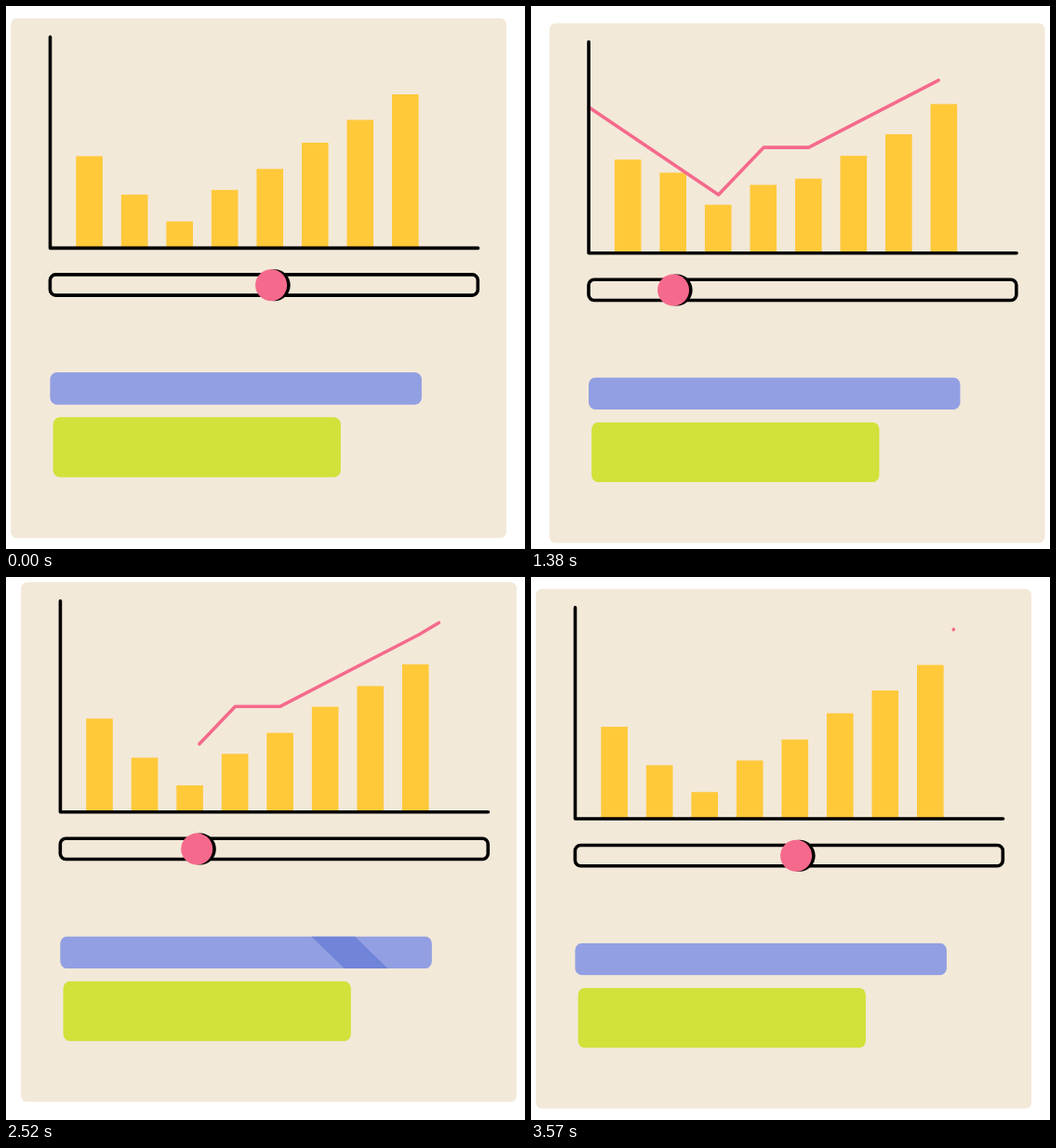
Recreate the animation shown at these times as an HTML page. Size 558 by 584 pixels, loop 3.6 s.

```html
<!DOCTYPE html>
<html lang="en">
<head>
<meta charset="utf-8">
<title>Chart panel</title>
<style>
  html, body { margin: 0; width: 100%; height: 100%; overflow: hidden; background: #fff; }
  svg { display: block; width: 558px; height: 584px; }
</style>
</head>
<body>
<svg viewBox="0 0 558 584" xmlns="http://www.w3.org/2000/svg">
  <defs>
    <clipPath id="blueClip"><rect x="47.4" y="394.1" width="399.5" height="34.6" rx="7.5"/></clipPath>
    <clipPath id="greenClip"><rect x="50.6" y="442.3" width="309.3" height="64.5" rx="7.5"/></clipPath>
  </defs>
  <g id="panel">
    <rect x="5.2" y="13.2" width="532.8" height="559" rx="6.5" fill="#f3e9d9"/>
    <g id="bars" fill="#ffc93a"></g>
    <path id="trend" fill="none" stroke="#f56a8c" stroke-width="3.6" stroke-linecap="round" stroke-linejoin="round"/>
    <g fill="none" stroke="#000" stroke-width="3.6" stroke-linecap="round" stroke-linejoin="round">
      <path d="M47.5 33.3V260.4H507.5"/>
      <rect x="47.4" y="288.9" width="459.9" height="22.2" rx="6"/>
    </g>
    <g id="knob">
      <circle cx="3.6" cy="300.2" r="17"/>
      <circle cy="300.2" r="17" fill="#f56a8c"/>
    </g>
    <g clip-path="url(#blueClip)">
      <rect x="47" y="394" width="401" height="35" fill="#929fe2"/>
      <path id="blueShine" d="M0 394h46.8l36 35h-46.8z" fill="#7084d9"/>
    </g>
    <g clip-path="url(#greenClip)">
      <rect x="50" y="442" width="311" height="65" fill="#d1e23a"/>
      <path id="greenShine" d="M0 442h47.6l66 65h-47.6z" fill="#c6d92e"/>
    </g>
  </g>
</svg>
<script>
const LOOP = 3600, STEP = 30, TURN = 1400;
const $ = id => document.getElementById(id);
const clamp = v => Math.min(1, Math.max(0, v));
const smooth = v => { v = clamp(v); return v * v * (3 - 2 * v); };

// Cubic ease with flat ends and handles at x1, x2
function ease(x, x1, x2) {
  x = clamp(x);
  let lo = 0, hi = 1;
  for (let i = 0; i < 24; i++) {
    const s = (lo + hi) / 2, r = 1 - s;
    if (3 * x1 * s * r * r + 3 * x2 * s * s * r + s * s * s < x) lo = s; else hi = s;
  }
  return smooth(lo);
}

// Resting top, rise, then start, peak and end of the pulse in ms
const bars = [
  [161.5, 4.6, 1100, 1790, 3000],
  [202.8, 29, 785, 1402, 2650],
  [231.7, 30, 350, 1020, 2200],
  [197.8, 23, 0, 650, 2050],
  [175.2, -6.8, 170, 920, 2320],
  [147, -9, 450, 1230, 2640],
  [122.5, -10.8, 741, 1500, 2965],
  [95, -13.5, 1066, 1820, 3194]
].map(([top, rise, start, peak, end], i) => {
  const el = document.createElementNS("http://www.w3.org/2000/svg", "rect");
  el.setAttribute("x", 75.3 + i * 48.53);
  el.setAttribute("width", 28.6);
  $("bars").append(el);
  return t => {
    const p = t < peak ? smooth((t - start) / (peak - start)) : 1 - smooth((t - peak) / (end - peak));
    const y = top - rise * p;
    el.setAttribute("y", y);
    el.setAttribute("height", 260 - y);
  };
});

const points = [[47.5, 103.5], [187, 197.7], [235.5, 146.8], [284, 146.8], [433, 69.6], [454.4, 56.8]];
const lengths = points.slice(1).map((p, i) => Math.hypot(p[0] - points[i][0], p[1] - points[i][1]));
const total = lengths.reduce((a, b) => a + b);

function trimmed(from, to) {
  if (to - from < 1e-5) return "";
  const out = [];
  let at = 0;
  lengths.forEach((len, i) => {
    const a = (from * total - at) / len, b = (to * total - at) / len;
    at += len;
    if (b <= 0 || a >= 1) return;
    const on = k => points[i].map((v, j) => v + (points[i + 1][j] - v) * clamp(k)).join(" ");
    if (!out.length) out.push(on(a));
    out.push(on(b));
  });
  return out.length ? "M" + out.join("L") : "";
}

function sweep(id, t, from, to, span, starts) {
  let x = from;
  for (const s of starts) if (t >= s && t <= s + span) x = from + (to - from) * smooth((t - s) / span);
  $(id).setAttribute("transform", `translate(${x} 0)`);
}

function draw(t) {
  const a = 2 * Math.PI * t / LOOP;
  $("panel").setAttribute("transform", `translate(${8.35 * (1 - Math.cos(a))} ${8 * Math.sin(a)})`);
  bars.forEach(bar => bar(t));

  const back = ease((t - TURN) / (LOOP - TURN), .57, .63);
  const away = t < TURN ? ease(t / TURN, .33, .544) : 1 - back;
  $("knob").setAttribute("transform", `translate(${285.1 - 146.7 * away} 0)`);
  $("trend").setAttribute("d", trimmed(back, ease(t / 1800, .33, .475)));

  sweep("blueShine", t, -85, 450, 600, [552, 2115]);
  sweep("greenShine", t, -65, 362, 400, [612, 3170]);
}

const began = performance.now();
function tick() {
  const t = (performance.now() - began) % LOOP;
  draw(Math.floor(t / STEP) * STEP);
  requestAnimationFrame(tick);
}
tick();
</script>
</body>
</html>
```
